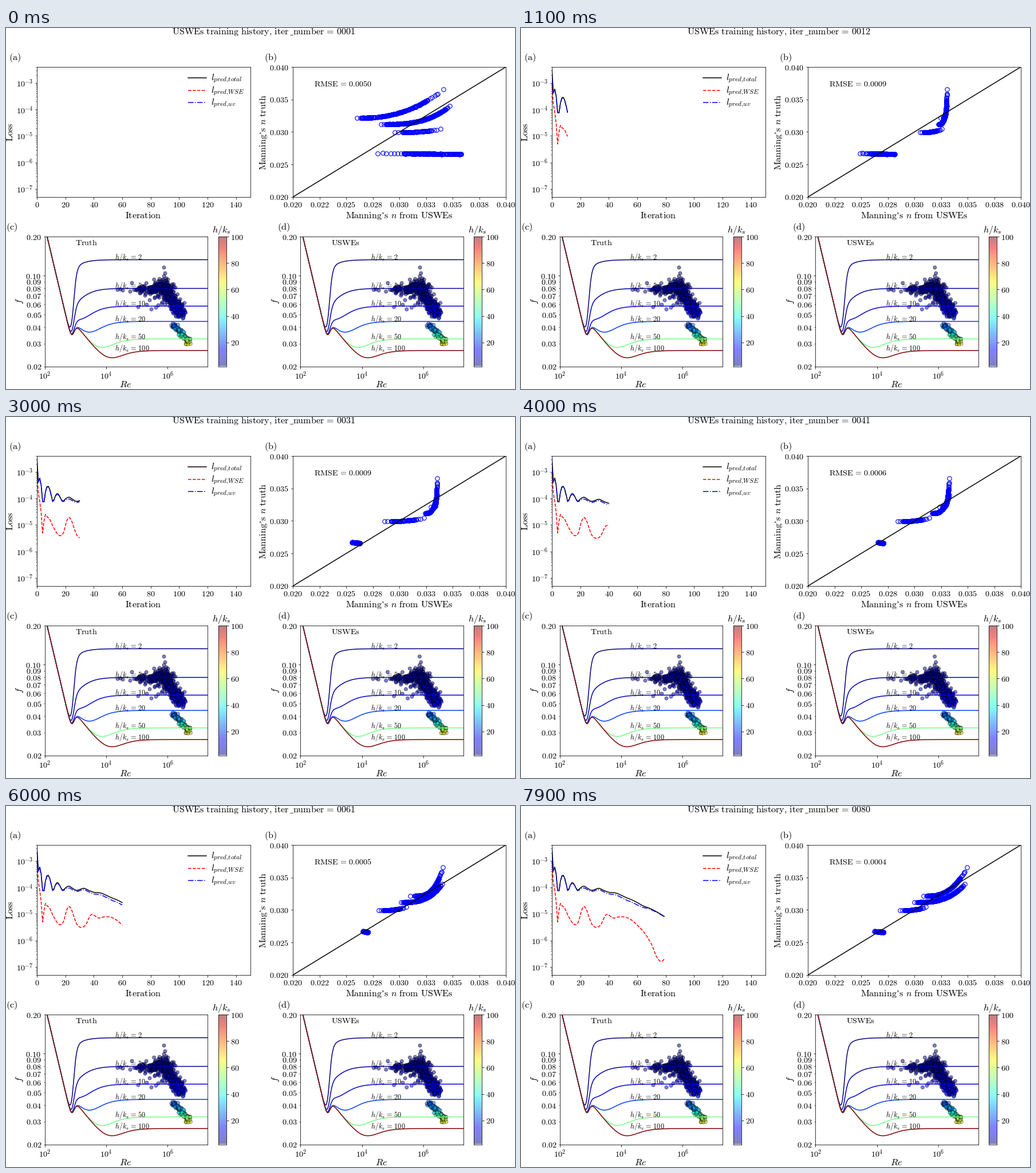
Animation, 889 px wide and 630 px high, one loop 8000 ms. Source, as a matplotlib script:

```python
import numpy as np
import matplotlib.pyplot as plt
from matplotlib.animation import FuncAnimation
from matplotlib.lines import Line2D

W, H, DPI = 889, 630, 64
PX = 72 / DPI                      # points per pixel
FRAMES, STEP = 80, 100
SMALL, TICK, LABEL = 12.2 * PX, 14.2 * PX, 16.2 * PX

plt.rcParams.update({
    "mathtext.fontset": "cm", "axes.linewidth": 0.8 * PX,
    "lines.linewidth": 1.5 * PX, "axes.unicode_minus": False,
    "xtick.labelsize": TICK, "ytick.labelsize": TICK})
for side in ("xtick", "ytick"):
    plt.rcParams.update({
        side + ".major.size": 3.5 * PX, side + ".major.width": 0.8 * PX,
        side + ".minor.size": 2 * PX, side + ".minor.width": 0.6 * PX,
        side + ".major.pad": 3.5 * PX, side + ".minor.pad": 3.4 * PX})

fig = plt.figure(figsize=(W / DPI, H / DPI), dpi=DPI, facecolor="white")
rng = np.random.default_rng(7)
jet = plt.get_cmap("jet")


def rm(s):
    """Upright text set as math, with plain word spaces."""
    s = s.replace(" = ", r"\hspace{0.133}=\hspace{0.133}")
    return r"$\mathrm{" + s.replace(" ", r"\ ") + "}$"


def text(x, y, s, size=LABEL, ha="left", rot=0):
    return fig.text(x / W, 1 - y / H, s, fontsize=size, ha=ha, va="baseline",
                    rotation=rot, rotation_mode="anchor")


def rule(x0, x1, y, **kw):
    fig.add_artist(Line2D([x0 / W, x1 / W], [1 - y / H] * 2, **kw))


def panel(x0, y0, x1, y1):
    return fig.add_axes([x0 / W, 1 - y1 / H, (x1 - x0) / W, (y1 - y0) / H])


def smooth(pts, t):
    """Cubic Hermite curve through (x, y) points."""
    x, y = np.array(pts, float).reshape(-1, 2).T
    m = np.gradient(y, x)
    k = np.clip(np.searchsorted(x, t, "right") - 1, 0, len(x) - 2)
    h = x[k + 1] - x[k]
    u = (t - x[k]) / h
    return ((1 + 2 * u) * (1 - u)**2 * y[k] + u * (1 - u)**2 * h * m[k]
            + u**2 * (3 - 2 * u) * y[k + 1] + u**2 * (u - 1) * h * m[k + 1])


# Title
text(289.5, 11, rm("USWEs training history{,} iter"))
rule(496, 500.8, 11.6, color="k", lw=0.7 * PX)
title = text(501.2, 11, "")

# (a) loss history
ax = panel(54, 68, 426.5, 295)
ax.set_yscale("log")
ax.set_xlim(0, 150)
ax.set_ylim(5e-8, 4e-3)
ax.set_xticks(range(0, 150, 20), labels=[rm(str(v)) for v in range(0, 150, 20)])
ax.set_yticks([10.0**e for e in range(-7, -2)],
              labels=[r"$10^{%d}$" % e for e in range(-7, -2)])
ax.set_yticks([m * 10.0**e for e in range(-8, -2) for m in range(2, 10)
               if 5e-8 <= m * 10.0**e <= 4e-3], minor=True)
ax.yaxis.set_minor_formatter(plt.NullFormatter())
text(5, 56, rm("(a)"))
text(240, 332, rm("Iteration"), ha="center")
text(12, 181.5, rm("Loss"), ha="center", rot=90)

its = np.arange(FRAMES)
total = smooth([
    0, -2.5, 1, -3.37, 2, -3.23, 3, -3.5, 4, -4.1, 5, -4.13, 6, -3.75,
    7, -3.56, 8, -3.54, 9, -3.65, 10, -3.86, 11, -4.1, 12, -4.05, 13, -3.9,
    14.5, -3.81, 16, -3.92, 18, -4.1, 20, -4.02, 22.5, -3.95, 25, -4.03,
    28, -4.11, 30, -4.08, 33, -4.03, 36, -4.1, 40, -4.18, 45, -4.21,
    49, -4.3, 53, -4.4, 56, -4.46, 60, -4.57, 64, -4.69, 68, -4.77,
    72, -4.87, 76, -4.99, 79, -5.09], its)
uv = total - np.interp(its, [0, 18, 22, 28, 40, 53, 60, 68, 79],
                       [0.02, 0.02, 0.07, 0.04, 0.06, 0.09, 0.09, 0.03, 0.01])
wse = smooth([
    0, -3, 1, -3.8, 2, -4.1, 3, -4.55, 4, -5.3, 5, -4.85, 6, -4.6, 7, -4.68,
    9, -4.78, 11, -5.02, 12, -5.12, 14.5, -5.34, 17, -5.4, 19, -5.25,
    20.5, -4.92, 22, -4.73, 24, -4.79, 26, -5.1, 28, -5.38, 30, -5.49,
    32, -5.5, 35, -5.35, 37, -5.1, 38.5, -5.01, 40, -5.04, 43, -5.15,
    47, -5.11, 53, -5.14, 57, -5.27, 60, -5.42, 64, -5.64, 66, -5.78,
    68, -5.95, 71, -6.25, 73, -6.55, 75, -6.72, 77, -6.8, 79, -6.7], its)

losses = []
for row, (data, col, style, name) in enumerate([
        (total, "k", "-", "total"), (wse, "r", "--", "WSE"),
        (uv, "b", "-.", "uv")]):
    line, = ax.plot([], [], color=col, ls=style)
    losses.append((line, 10**data))
    rule(317.5, 349.5, 87 + 21.7 * row, color=col, ls=style)
    text(358.5, 91 + 21.7 * row, "$l_{pred{,}%s}$" % name)

# (b) predicted against true roughness
bx = panel(501, 68, 873, 295)
bx.set_xlim(20, 40)
bx.set_ylim(20, 40)
bx.set_xticks(np.arange(20, 40.1, 2.5), labels=[rm("0.0" + v) for v in
              "20 22 25 28 30 33 35 38 40".split()])
bx.set_yticks(range(20, 41, 5), labels=[rm("0.0%d" % v) for v in range(20, 41, 5)])
bx.plot([20, 40], [20, 40], "k")
text(451, 56, rm("(b)"))
text(687, 332, rm("Manning’s ") + "$n$" + rm(" from USWEs"), ha="center")
text(454, 181.5, rm("Manning’s ") + "$n$" + rm(" truth"), ha="center", rot=90)
rmse = text(538, 102, "", TICK)

KEYS = [0, 11, 30, 40, 53, 68, 79]


class Group:
    """Points with fixed truth whose predicted span moves (n x 1000)."""

    def __init__(self, s, low, high, power, left, right, bend=(1,) * 7):
        self.s = s
        self.y = low + (high - low) * s**power + rng.normal(0, 0.02, len(s))
        self.keys = left, right, bend
        self.line, = bx.plot([], [], "o", mfc="none", mec="b", ms=7.4 * PX,
                             mew=1.1 * PX, zorder=1)

    def move(self, t, shift):
        a, b, p = (np.interp(t, KEYS, k) for k in self.keys)
        self.line.set_data(a + (b - a) * self.s**p + shift, self.y)


def spread(n, lo, hi, *extra):
    return np.r_[rng.uniform(lo, hi, n), extra]


groups = [
    Group(spread(150, 0.31, 1, 0, 0.06, 0.1, 0.16, 0.2, 0.24, 0.28, 1),
          26.72, 26.6, 1,
          [27.96, 24.89, 25.54, 26.56, 26.61, 26.5, 26.24],
          [35.81, 28.17, 26.29, 27.1, 27.04, 27.04, 27.1]),
    Group(spread(60, 0.15, 0.8, 0, 0.08, 0.86, 0.91, 1), 29.96, 30.48, 3,
          [29.57, 30.54, 28.6, 28.44, 28.01, 28.12, 28.66],
          [33.87, 32.58, 32.31, 31.4, 30.65, 30.59, 31.08]),
    Group(spread(260, 0.07, 0.97, 0, 0.04, 1), 31.19, 34.01, 3,
          [28.28, 32.26, 32.42, 31.67, 30.65, 29.57, 30.0],
          [34.73, 33.06, 33.55, 33.28, 33.71, 34.35, 34.73]),
    Group(spread(200, 0.05, 0.82, 0, 0.04, 0.85, 0.87, 0.9, 0.92, 0.935, 1),
          32.16, 36.6, 2.4,
          [26.02, 32.47, 32.96, 32.37, 31.56, 30.38, 30.86],
          [34.14, 33.06, 33.55, 33.28, 33.71, 34.52, 34.95],
          [1, 0.3, 0.3, 0.4, 0.6, 0.7, 0.85]),
]

# (c), (d) friction factor diagrams
RATIOS = [2, 5, 10, 20, 50, 100]
norm = plt.Normalize(2, 100)


def friction(re, ratio):
    a = 1 / (1 + (re / 850)**9)
    b = 1 / (1 + (re / (160 * ratio))**1.8)
    smooth_wall = 1.8 * np.log10(re / 2.1)
    rough_wall = 2 * np.log10(11.8 * ratio)
    return 1 / ((re / 24)**a * smooth_wall**(2 * (1 - a) * b)
                * rough_wall**(2 * (1 - a) * (1 - b)))


def cloud():
    """Sample positions in log10(Re) and log10(f)."""
    lone = np.array([
        195, 457, 200, 456, 204, 458, 217, 460, 220, 445, 224, 457, 229, 458,
        231, 487, 234, 456, 237, 461, 243, 467, 246, 483, 251, 475, 254, 491,
        266, 484, 262, 488, 242, 450, 276, 418, 278, 428, 276, 433, 280, 437,
        274, 440, 279, 442, 313, 496, 309, 507, 272, 481]).reshape(-1, 2)
    tail = np.c_[rng.uniform(226, 262, 45), rng.normal(457, 3.2, 45)]
    head = np.c_[rng.normal(269, 9, 130), rng.normal(455, 7.5, 130)]
    t = rng.uniform(0, 1, 330)
    body = np.c_[277 + 30 * t + rng.normal(0, 4.2, 330),
                 457 + 41 * t + rng.normal(0, 6, 330)]
    t = rng.uniform(0, 1, 120)
    deep = np.c_[291 + 30 * t + rng.normal(0, 1.9, 120),
                 517 + 32 * t + rng.normal(0, 2.2, 120)]
    x, y = np.vstack([lone, tail, head, body, deep]).T
    return 2 + (x - 67.5) / 53.67, np.log10(0.2) - (y - 364) / 226.5


log_re, log_f = cloud()
depth = 10**(0.5 / np.sqrt(10**log_f)) / 11.8
wobble = rng.normal(0, 0.012, len(log_re))
re = np.logspace(2, np.log10(2e7), 600)


def diagram(dx, tag, name):
    cx = panel(67.5 + dx, 364, 352 + dx, 590.5)
    cx.set_xscale("log")
    cx.set_yscale("log")
    cx.set_xlim(1e2, 2e7)
    cx.set_ylim(0.02, 0.2)
    cx.set_xticks([1e2, 1e4, 1e6], labels=["$10^%d$" % e for e in (2, 4, 6)])
    cx.xaxis.set_minor_locator(plt.NullLocator())
    cx.set_yticks([0.1], labels=[rm("0.10")])
    minor = [2, 3, 4, 5, 6, 7, 8, 9, 20]
    cx.set_yticks([v / 100 for v in minor], minor=True,
                  labels=[rm("%.2f" % (v / 100)) for v in minor])
    for r in RATIOS:
        cx.plot(re, friction(re, r), color=jet(norm(r)))
        level = friction(2e7, r)
        text(190 + dx, 364 - 226.5 * np.log10(level / 0.2),
             "$h/k_s$" + rm(" = %d" % r), SMALL)
    pts = cx.scatter(10**log_re, 10**log_f, s=(6 * PX)**2, c=depth, cmap=jet,
                     norm=norm, alpha=0.5, edgecolors="k", linewidths=PX,
                     zorder=1)
    text(dx * 1.061, 352, rm(tag))
    text(121 + dx, 379, rm(name), TICK)
    text(209 + dx, 627, "$Re$", ha="center")
    text(28 + dx, 477, "$f$", ha="center", rot=90)

    bar = panel(370.5 + dx, 364, 384.5 + dx, 590.5)
    bar.imshow(np.linspace(0, 1, 256)[:, None], cmap=jet, alpha=0.5,
               origin="lower", aspect="auto", extent=[0, 1, 2, 100])
    bar.set_xticks([])
    bar.yaxis.tick_right()
    bar.set_yticks(range(20, 101, 20),
                   labels=[rm(str(v)) for v in range(20, 101, 20)])
    text(360 + dx, 357, "$h/k_s$")
    return pts


diagram(0, "(c)", "Truth")
predicted = diagram(446.7, "(d)", "USWEs")


def update(i):
    title.set_text(rm("number = %04d" % (i + 1)))
    for line, data in losses:
        line.set_data(its[:i + 1], data[:i + 1])

    # fast first steps, then a damped swing around the trend
    t = 11 * (1 - np.exp(-i / 1.3)) if i < 11 else i
    swing = np.interp(i, [0, 1, 2, 4.5, 8, 11, 14.5, 18, 22.5, 26, 30],
                      [0, 0, 0.5, 0, -0.45, 0, 0.3, 0, -0.2, 0, 0])
    for g in groups:
        g.move(t, swing)
    err = np.interp(i, [0, 1, 2, 4, 8, 11, 14, 18, 22, 30, 40, 53, 68, 79],
                    [50, 20, 17, 10, 13, 9, 11, 9, 10, 9, 6, 5, 5, 4])
    rmse.set_text(rm("RMSE = %.4f" % (err / 1e4)))

    predicted.set_offsets(np.c_[10**(log_re + wobble * np.cos(i / 9)), 10**log_f])


anim = FuncAnimation(fig, update, frames=FRAMES, interval=STEP, repeat=True,
                     repeat_delay=0, init_func=lambda: update(0))
plt.show()
```
